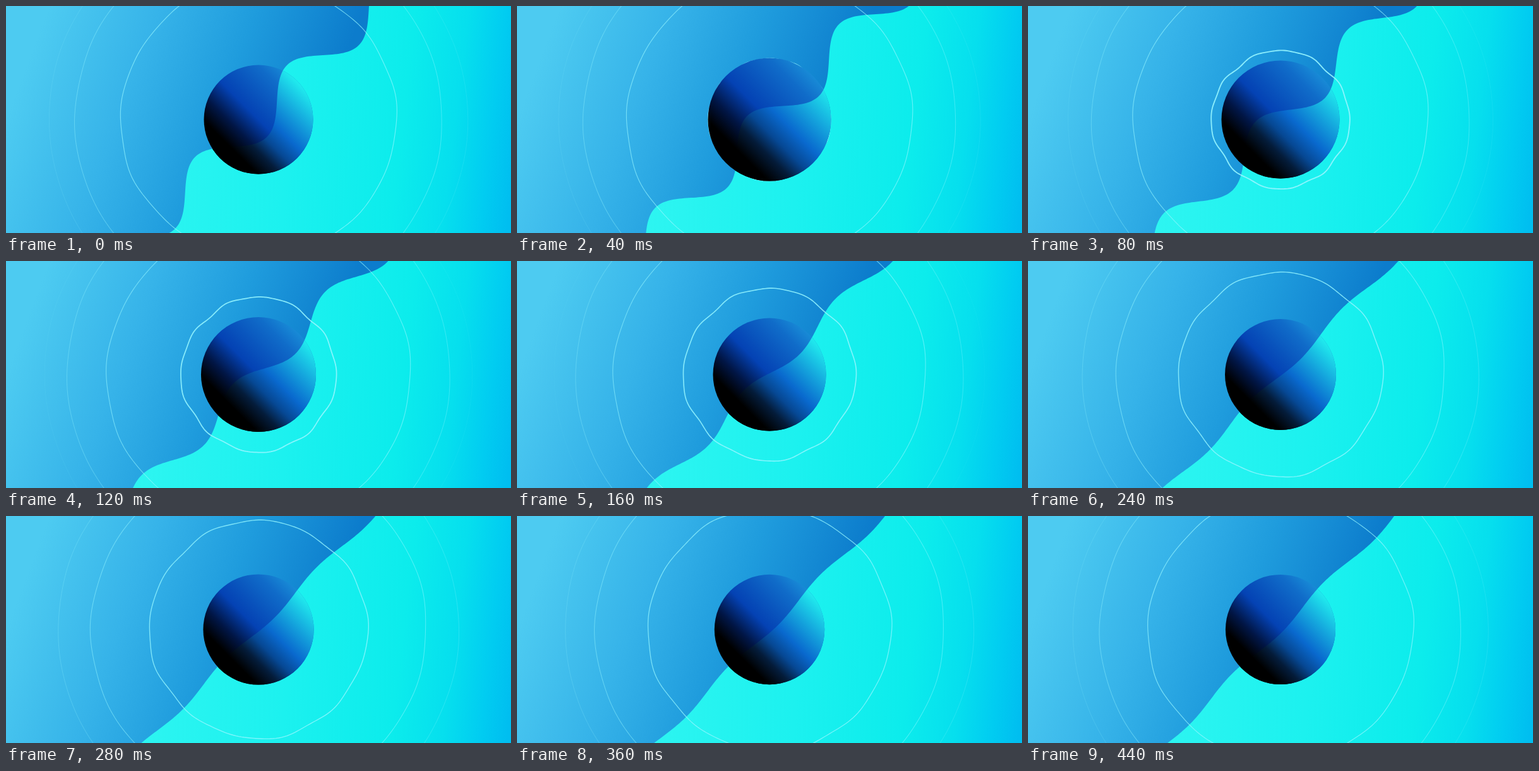
Write an HTML page with a canvas that moves like this. It is 800 px wide and 360 px high and loops after 0.48 s.

```html
<!DOCTYPE html>
<html lang="en">
<head>
<meta charset="utf-8">
<title>Pulse</title>
<style>
html, body { margin: 0; width: 100%; height: 100%; overflow: hidden; }
canvas { display: block; }
</style>
</head>
<body>
<canvas id="stage" width="800" height="360"></canvas>
<script>
const ctx = document.getElementById('stage').getContext('2d');
const W = 800, H = 360, CX = 400, CY = 180;
const STEP = 40, STEPS = 12, TAU = Math.PI * 2;

function gradient(x0, y0, x1, y1, stops) {
  const g = ctx.createLinearGradient(x0, y0, x1, y1);
  for (const [at, rgb] of stops) g.addColorStop(at, `rgb(${rgb})`);
  return g;
}

const blue = gradient(0, 180, 437, 346, [
  [0, '77,203,241'], [.36, '54,179,233'], [.66, '31,156,221'], [1, '12,124,204']
]);
const cyan = gradient(220, 160, 808, 230, [
  [0, '46,245,241'], [.4, '28,241,239'], [.69, '12,236,236'],
  [.83, '6,223,238'], [.93, '1,204,241'], [1, '0,190,240']
]);
const orbBlue = [
  [0, '0,0,0'], [.14, '0,0,0'], [.3, '1,22,70'], [.5, '4,66,180'],
  [.85, '16,108,201'], [1, '24,138,214']
];
const orbCyan = [
  [0, '0,0,0'], [.14, '0,0,0'], [.29, '4,28,58'], [.42, '6,72,148'],
  [.57, '9,105,206'], [.76, '20,162,220'], [1, '32,236,238']
];

// Region right of the diagonal wave: along = x - y, across = x + y
function wavePath(n) {
  const since = Math.max(0, n - 1) / 2.6;
  const amp = 6.5 + 34.5 * Math.exp(-since * since);
  const age = (n + STEPS - 1) % STEPS;
  const trough = 190 - 11.8 * age;
  const path = new Path2D();
  for (let along = 720; along >= -320; along -= 4) {
    const across = 580 - amp * Math.cos((along - trough) * TAU / 291);
    path.lineTo((across + along) / 2, (across - along) / 2);
  }
  path.lineTo(W + 100, H + 100);
  path.lineTo(W + 100, -100);
  path.closePath();
  return path;
}

function ring(age) {
  const alpha = .95 * (1 - age / 42);
  if (alpha <= 0) return;
  const lag = (age - 2) / 3;
  const radius = 383 - 296 * Math.exp(-age * .0488) - 6 * Math.exp(-lag * lag);
  const wobble = 2.4 * Math.exp(-age / 22) * (1 - Math.exp(-age));
  const turn = 1.66 - age * .03;
  ctx.beginPath();
  for (let i = 0; i < 240; i++) {
    const a = i / 240 * TAU, b = a - turn;
    const r = radius + wobble *
      (.7 * Math.cos(4 * b) + .6 * Math.cos(9 * b) + .5 * Math.cos(13 * a + 1 + age * .1));
    ctx.lineTo(CX + r * Math.cos(a), CY + r * Math.sin(a));
  }
  ctx.closePath();
  ctx.lineWidth = 1 + 1.2 * Math.exp(-age / 6);
  ctx.strokeStyle = `rgba(150,246,255,${alpha})`;
  ctx.stroke();
}

function orb(r, stops) {
  const k = r * Math.SQRT1_2;
  ctx.fillStyle = gradient(CX - k, CY + k, CX + k, CY - k, stops);
  ctx.beginPath();
  ctx.arc(CX, CY, r, 0, TAU);
  ctx.fill();
}

function draw(n) {
  const wave = wavePath(n);
  ctx.fillStyle = blue;
  ctx.fillRect(0, 0, W, H);
  ctx.fillStyle = cyan;
  ctx.fill(wave);
  for (let age = n; age < 42; age += STEPS) ring(age);

  const r = n ? 87 + 10.5 * Math.exp((1 - n) / 2.1) : 86.5;
  orb(r, orbBlue);
  ctx.save();
  ctx.clip(wave);
  orb(r, orbCyan);
  ctx.restore();
}

const start = performance.now();
function tick() {
  draw(Math.floor((performance.now() - start) / STEP) % STEPS);
  requestAnimationFrame(tick);
}
tick();
</script>
</body>
</html>
```
